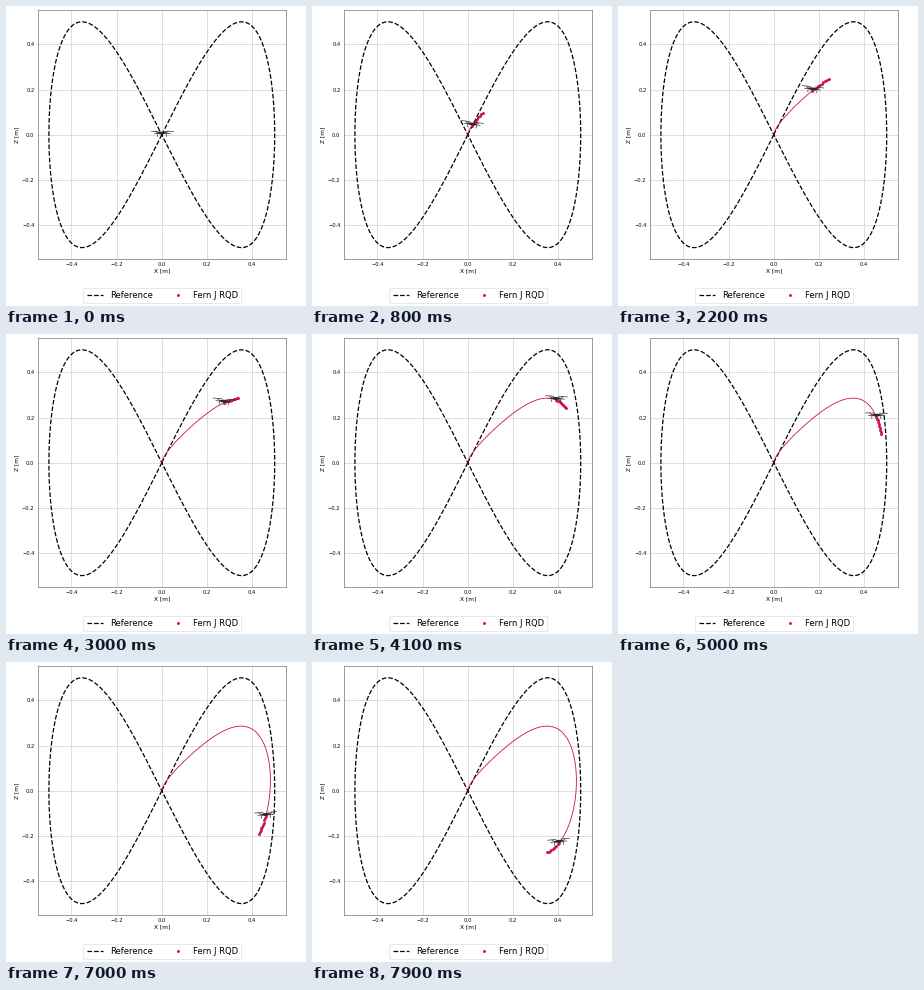
A matplotlib script that plays this animation: 300 by 300 pixels, repeating every 8000 ms.

```python
import numpy as np
import matplotlib.pyplot as plt
from matplotlib.animation import FuncAnimation
from matplotlib.lines import Line2D
from matplotlib.patches import Ellipse

FRAMES, STEP = 80, 100
HORIZON, DOTS = 0.55, 10
SIZE, SIDE = 300, 248.4
PX = 1.1 / SIDE  # metres per pixel
RED, DARK = "#cf0f50", "#2a2a2a"


def position(t):
    """Lagging figure-eight flight that starts from rest."""
    t = np.asarray(t)
    x_time = t - 1.08 * np.tanh(t / 1.08)
    z_time = t - 1.09 * (1 - np.exp(-t / 1.09))
    return np.array([0.481 * np.sin(0.315 * x_time),
                     0.286 * np.sin(0.6 * z_time)])


def pitch(t):
    return np.radians(-8 * np.cos(np.pi * t / 11) * np.tanh(3 * t))


def label(x, y, text, **kw):
    fig.text(x / SIZE, y / SIZE, text, size=7.1, ha="center", va="center", **kw)


fig = plt.figure(figsize=(5, 5), dpi=60, facecolor="white")
ax = fig.add_axes([31.6 / SIZE, 47.1 / SIZE, SIDE / SIZE, SIDE / SIZE])
ax.set(xlim=(-0.55, 0.55), ylim=(-0.55, 0.55))
ticks = np.arange(-2, 3) * 0.2
ax.set_xticks(ticks)
ax.set_yticks(ticks)
ax.tick_params(labelsize=6.1, length=0, pad=3.8)
ax.set_axisbelow(True)
ax.grid(color="#cccccc", lw=0.8)
ax.spines[:].set(color="#6e6e6e", linewidth=0.8)
label(155.8, 35, "X [m]")
label(11.3, 171.5, "Z [m]", rotation=90)

a = np.linspace(0, 2 * np.pi, 600)
ref, = ax.plot(0.5 * np.sin(a), 0.5 * np.sin(2 * a), "k--", lw=1.5, zorder=3)
trail, = ax.plot([], [], color=RED, lw=1, zorder=4)
plan, = ax.plot([], [], "o", color=RED, ms=2.4, zorder=5)

# Drone halves in pixels: far rotor, near rotor, arm, leg
HALF = [[(2.5, 3.8), (11, 3.8)], [(1, 1.4), (8, 1.4)],
        [(0, 2.2), (5, 2.2), (6.5, 3.6)], [(4.5, 2), (4.5, -1.8)]]
parts = [np.array(p) * (side, 1) for side in (-1, 1) for p in HALF]
lines = [ax.plot([], [], color=DARK, lw=0.8, zorder=7)[0] for _ in parts]
body = ax.add_patch(Ellipse((0, 0), 8 * PX, 2.8 * PX, color=DARK, lw=0,
                            zorder=7))

dot = Line2D([], [], color=RED, marker="o", ms=2.4, ls="none")
fig.legend([ref, dot], ["Reference", "Fern J RQD"], loc="center", ncol=2,
           fontsize=10, edgecolor="#dddddd",
           bbox_to_anchor=(156.2 / SIZE, 10.5 / SIZE))


def place_drone(center, angle):
    c, s = np.cos(angle), np.sin(angle)
    turn = np.array([(c, s), (-s, c)])
    for line, part in zip(lines, parts):
        line.set_data(*(part @ turn * PX + center).T)
    body.set_center(np.array([0, 1.7]) @ turn * PX + center)
    body.set_angle(np.degrees(angle))


def update(frame):
    t = frame * STEP / 1000
    trail.set_data(*position(np.linspace(0, t, 4 * frame + 2)))
    plan.set_data(*position(np.linspace(t, t + HORIZON, DOTS)))
    plan.set_visible(frame > 0)
    place_drone(position(t), pitch(t))
    return [trail, plan, body, *lines]


anim = FuncAnimation(fig, update, frames=FRAMES, interval=STEP, repeat=True,
                     repeat_delay=0)
plt.show()
```
